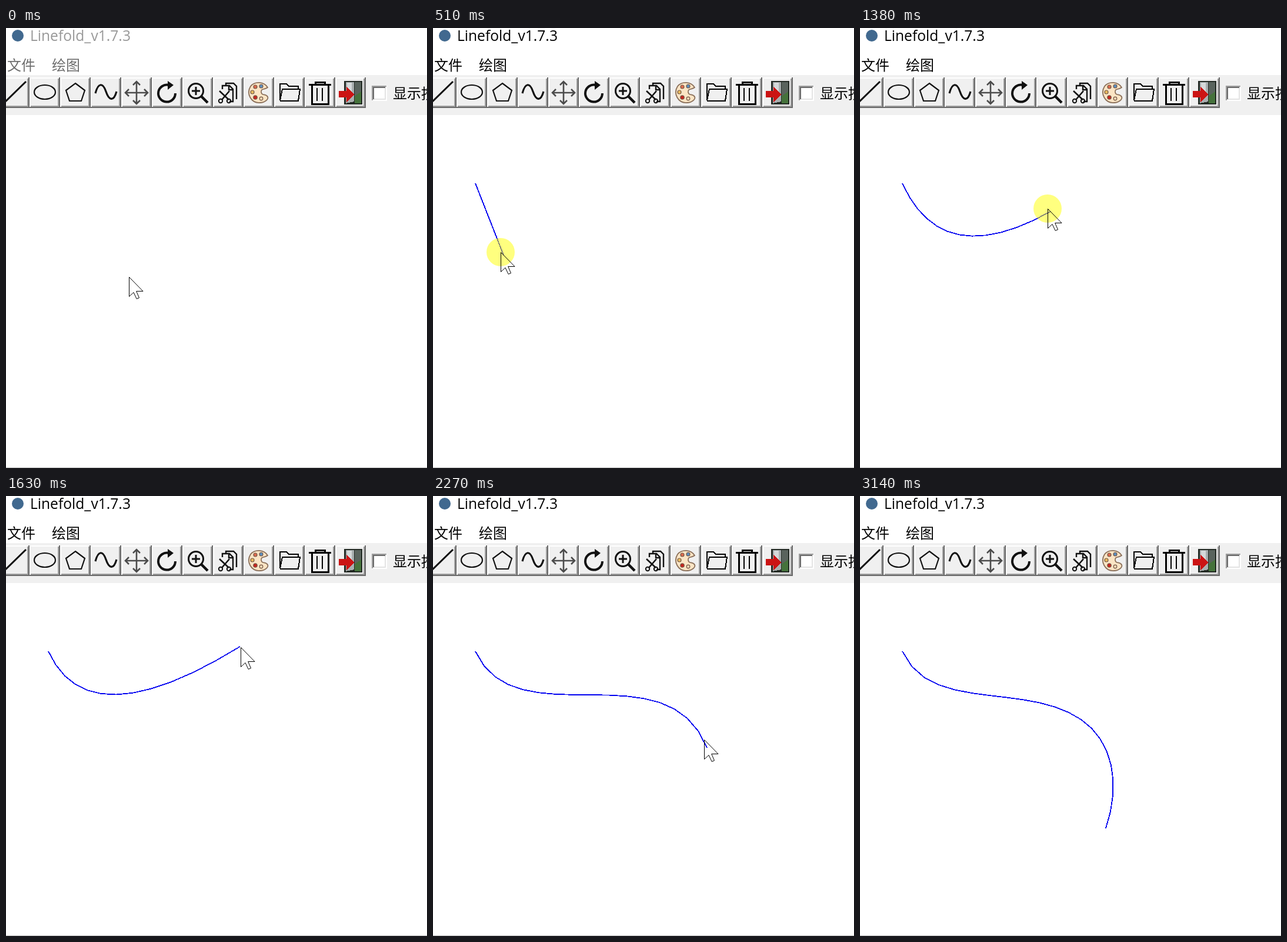
Write an HTML page that moves like this. It is 716 px wide and 748 px high and loops after 3780 ms.

```html
<!DOCTYPE html>
<html lang="zh">
<head>
<meta charset="utf-8">
<style>
html, body { margin: 0; width: 100%; height: 100%; overflow: hidden; background: #fff; }
svg { display: block; }
text { white-space: pre; }
.title { font: 24.6px "Open Sans", "Noto Sans", sans-serif; fill: #000; }
.cjk { font: 24px "Noto Sans CJK SC", "Noto Sans CJK", sans-serif; font-weight: 300; fill: #000; }
.idle .title { fill: #999; }
.idle .menu { fill: #6d6d6d; }
.icon { fill: none; stroke: #111; stroke-width: 2; }
.crisp { shape-rendering: crispEdges; }
</style>
</head>
<body>
<svg id="stage" width="716" height="748" viewBox="0 0 716 748">
  <rect width="716" height="748" fill="#fff"/>
  <circle cx="20" cy="13" r="10" fill="#41698f"/>
  <text class="title" x="41" y="22">Linefold_v1.7.3</text>
  <text class="cjk menu" x="2" y="72">文件</text>
  <text class="cjk menu" x="78" y="72">绘图</text>
  <rect y="80" width="716" height="68" fill="#f0f0f0"/>
  <g id="buttons" class="crisp"></g>

  <g class="icon">
    <!-- line, ellipse, polygon, curve -->
    <path d="M-2 126L34 91" stroke-width="3"/>
    <ellipse cx="66" cy="109" rx="18" ry="12" stroke-width="2.2"/>
    <path d="M118 94L134 106L128 124H108L102 106Z" stroke-width="2.2"/>
    <path d="M152 111C157 92 165 93 170 108S183 126 188 108" stroke-width="3.2"/>
    <!-- move -->
    <path d="M203 110H241M222 91V129M209 104L203 110L209 116M235 104L241 110L235 116M216 97L222 91L228 97M216 123L222 129L228 123" stroke="#4c4c4c" stroke-width="2.6"/>
    <!-- rotate -->
    <path d="M277 97A14.5 14.5 0 1 0 288 111" stroke-width="4"/>
    <path d="M275 90L285 97L275 105Z" fill="#111" stroke="none"/>
    <!-- zoom -->
    <circle cx="323" cy="107" r="12.5" stroke-width="3"/>
    <path d="M316 107H330M323 100V114" stroke-width="3"/>
    <path d="M332 116L343 127" stroke-width="4.5"/>
    <!-- cut and copy -->
    <path d="M368 104V98H380L386 104V125H380M374 97V94H387L392 99V121M379 98V105H386" stroke-width="2.4"/>
    <path d="M363 107L379 122M380 107L367 122" stroke-width="2.6"/>
    <circle cx="365" cy="124" r="3.2"/><circle cx="379" cy="124" r="3.2"/>
    <!-- palette -->
    <path d="M445 101C439 91 423 90 416 99C408 112 417 128 432 127C440 127 447 121 445 117C442 111 435 116 434 109C433 102 441 105 445 101Z" fill="#fbe5c5" stroke="#8b705a" stroke-width="1.8"/>
    <g stroke="#74594a" stroke-width="1.2">
      <circle cx="424" cy="100" r="3" fill="#dd6a4c"/>
      <circle cx="434" cy="99" r="3" fill="#5b8fc0"/>
      <circle cx="419" cy="109" r="3" fill="#e8ba5d"/>
      <circle cx="424" cy="118" r="3.2" fill="#c9241d"/>
      <circle cx="434" cy="120" r="2.8" fill="#f4d9b4"/>
    </g>
    <!-- folder -->
    <path class="crisp" d="M466 123V95H477L481 99H497V104M466 123L470 104H500L497 124H466" stroke="#000"/>
    <!-- bin -->
    <path class="crisp" d="M515 96H553M526 95V92H542V95M520 98V129H548V98" stroke="#000" stroke-width="3"/>
    <path class="crisp" d="M529 102V124M538 102V124" stroke="#000"/>
  </g>

  <!-- exit -->
  <g class="crisp">
    <rect x="575" y="90" width="31" height="40" fill="#242b25"/>
    <path d="M578 92H592V125L578 128Z" fill="#a9afb0"/>
    <path d="M580 93H588V108L580 118Z" fill="#d5d9da"/>
    <path d="M593 92H604V108L593 116Z" fill="#59635d"/>
    <path d="M593 116L604 108V128H593Z" fill="#45723b"/>
    <path d="M566 107H579V100L592 113L579 126V118H566Z" fill="#cb1414"/>
    <!-- checkbox -->
    <rect x="622" y="98" width="26" height="26" fill="#fff"/>
    <path d="M645 100V121H624" fill="none" stroke="#e3e3e3" stroke-width="2"/>
    <path d="M623 123V99H647" fill="none" stroke="#a0a0a0" stroke-width="2"/>
    <path d="M625 121V101H645" fill="none" stroke="#696969" stroke-width="2"/>
    <rect y="747" width="716" height="1" fill="#bdbdbd"/>
  </g>
  <text class="cjk" x="658" y="120">显示按钮</text>

  <polyline id="curve" class="crisp" fill="none" stroke="#0000f0" stroke-width="1.8"/>
  <g id="pointer">
    <circle id="halo" r="24" fill="#ff0" fill-opacity=".5"/>
    <path d="M.5 .5V33.5L8 26.5L13.2 37.5L17.5 35.7L12.7 24.5H24Z" fill="none" stroke="#000"/>
  </g>
</svg>
<script>
const LOOP = 3780;
const TICK = 125.6;    // the screen is sampled at this pace
const LAST_TICK = 25;  // the pointer has left by then
const LEAD = 5;        // the drawn end runs slightly ahead of the pointer
const ORIGIN = [72, 264];

// pointer path: tick, x, y
const path = [
  [0, 209, 423], [2, 66, 259], [4, 115, 381], [5, 134, 410],
  [8, 217, 413], [11, 319, 307], [13, 399, 257], [15, 493, 316],
  [18, 461, 414], [21, 425, 543], [22, 412, 560], [24, 601, 663]
];

// each drag leaves one control point
const drags = [
  { press: 2, release: 6, point: [140, 415] },
  { press: 10, release: 13, point: [398, 256] },
  { press: 14, release: 18, point: [466, 428] },
  { press: 20, release: 22, point: [418, 565] }
];

const $ = id => document.getElementById(id);
const stage = $("stage"), curve = $("curve"), pointer = $("pointer"), halo = $("halo");

function drawButtons() {
  const edge = (d, color) => `<path d="${d}" fill="none" stroke="${color}" stroke-width="2"/>`;
  let out = "";
  for (let i = 0; i < 12; i++) {
    const x = 52 * i - 12, r = x + 52;
    out += edge(`M${x + 1} 136V85H${r}`, "#fff")
      + edge(`M${r - 3} 86V133H${x + 2}`, "#a0a0a0")
      + edge(`M${r - 1} 84V135H${x}`, "#696969");
  }
  $("buttons").innerHTML = out;
}

const mix = (a, b, t) => a + (b - a) * t;

// Smooth path through the keys (cubic Hermite)
function pointerAt(tick) {
  const last = path.length - 1;
  const i = Math.min(path.findLastIndex(k => k[0] <= tick), last - 1);
  const [a, b] = [path[i], path[i + 1]];
  const span = b[0] - a[0], t = Math.min((tick - a[0]) / span, 1);
  const slope = (j, axis) => {
    const p = path[Math.max(j - 1, 0)], q = path[Math.min(j + 1, last)];
    return (q[axis] - p[axis]) / (q[0] - p[0]);
  };
  return [1, 2].map(axis =>
    mix(a[axis], b[axis], t * t * (3 - 2 * t))
    + span * t * (1 - t) * ((1 - t) * slope(i, axis) - t * slope(i + 1, axis)));
}

// Bezier point of any degree
function bezier(points, t) {
  while (points.length > 1) {
    points = points.slice(1).map((p, i) => [mix(points[i][0], p[0], t), mix(points[i][1], p[1], t)]);
  }
  return points[0];
}

function trace(points) {
  const count = points.length < 3 ? 1 : 4 * points.length;
  return Array.from({ length: count + 1 }, (_, i) => bezier(points, i / count).map(v => v.toFixed(1))).join(" ");
}

let shown = -1;

function draw(now) {
  const tick = Math.min(Math.floor((now % LOOP + 5) / TICK), LAST_TICK);
  if (tick === shown) return;
  shown = tick;

  const [x, y] = pointerAt(tick);
  const held = drags.some(d => tick >= d.press && tick < d.release);
  const points = [ORIGIN, ...drags.filter(d => tick >= d.release).map(d => d.point)];
  if (held) points.push([x + LEAD, y + LEAD]);

  curve.setAttribute("points", points.length > 1 ? trace(points) : "");
  pointer.setAttribute("transform", `translate(${Math.round(x)} ${Math.round(y)})`);
  pointer.style.display = tick < LAST_TICK ? "" : "none";
  halo.style.display = held ? "" : "none";
  stage.classList.toggle("idle", tick < drags[0].press);
}

function run() {
  draw(performance.now());
  requestAnimationFrame(run);
}

drawButtons();
run();
</script>
</body>
</html>
```
